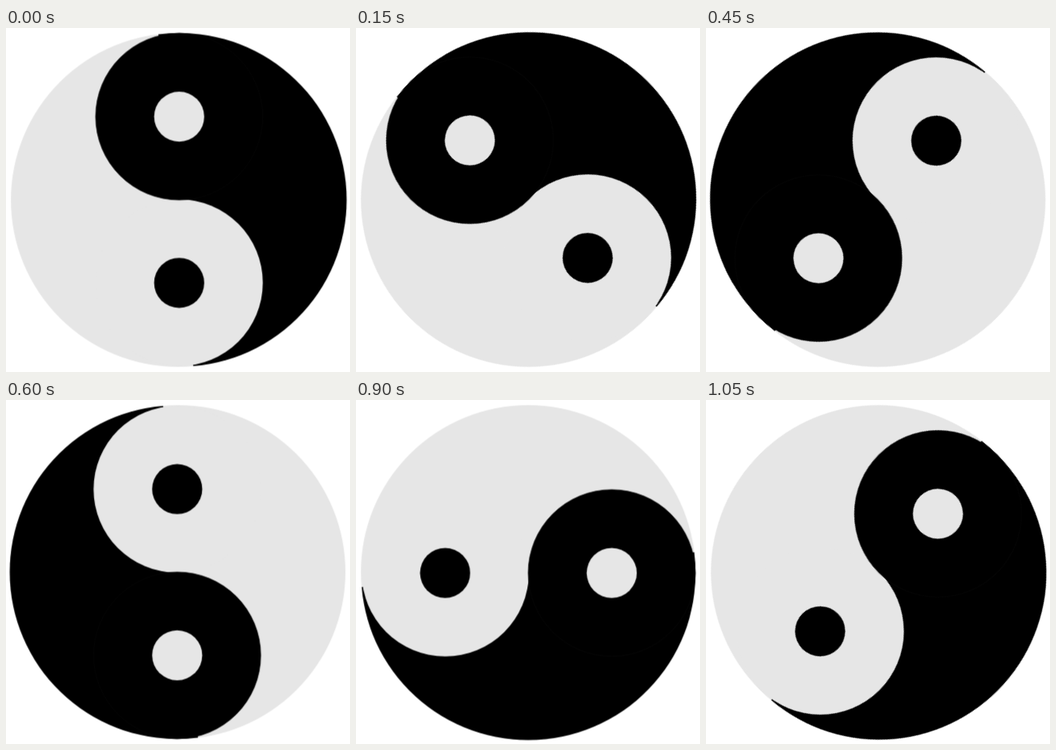
An HTML page that plays this animation: 434 px wide and 435 px high, repeating every 1200 ms.

```html
<!DOCTYPE html>
<html lang="en">
<head>
<meta charset="utf-8">
<title>Turning yin and yang</title>
<style>
  html, body { margin: 0; width: 100%; height: 100%; overflow: hidden; background: #fff; }
  svg { display: block; width: 100%; height: 100%; }
  .light { fill: #e6e6e6; }
  .seam { stroke: #090909; stroke-width: .7; }
  #symbol {
    transform-origin: 0 0;
    animation: turn 1200ms steps(8, end) infinite;
  }
  @keyframes turn {
    from { transform: rotate(0deg); }
    to { transform: rotate(-360deg); }
  }
</style>
</head>
<body>
<!-- The view box puts the centre of rotation at the origin. -->
<svg viewBox="-217.25 -217.5 434 435">
  <g id="symbol">
    <circle class="light" r="211"/>
    <path d="M-25 -209.5A211 211 0 1 1 19 210.1Z"/>
    <circle class="light" cx="1.25" cy="104.6" r="105.5"/>
    <circle class="seam" cx="1.25" cy="-105.4" r="105.4"/>
    <circle class="light" cx="1.25" cy="-105.4" r="31.6"/>
    <circle cx="1.25" cy="104.8" r="31.6"/>
  </g>
</svg>
</body>
</html>
```
